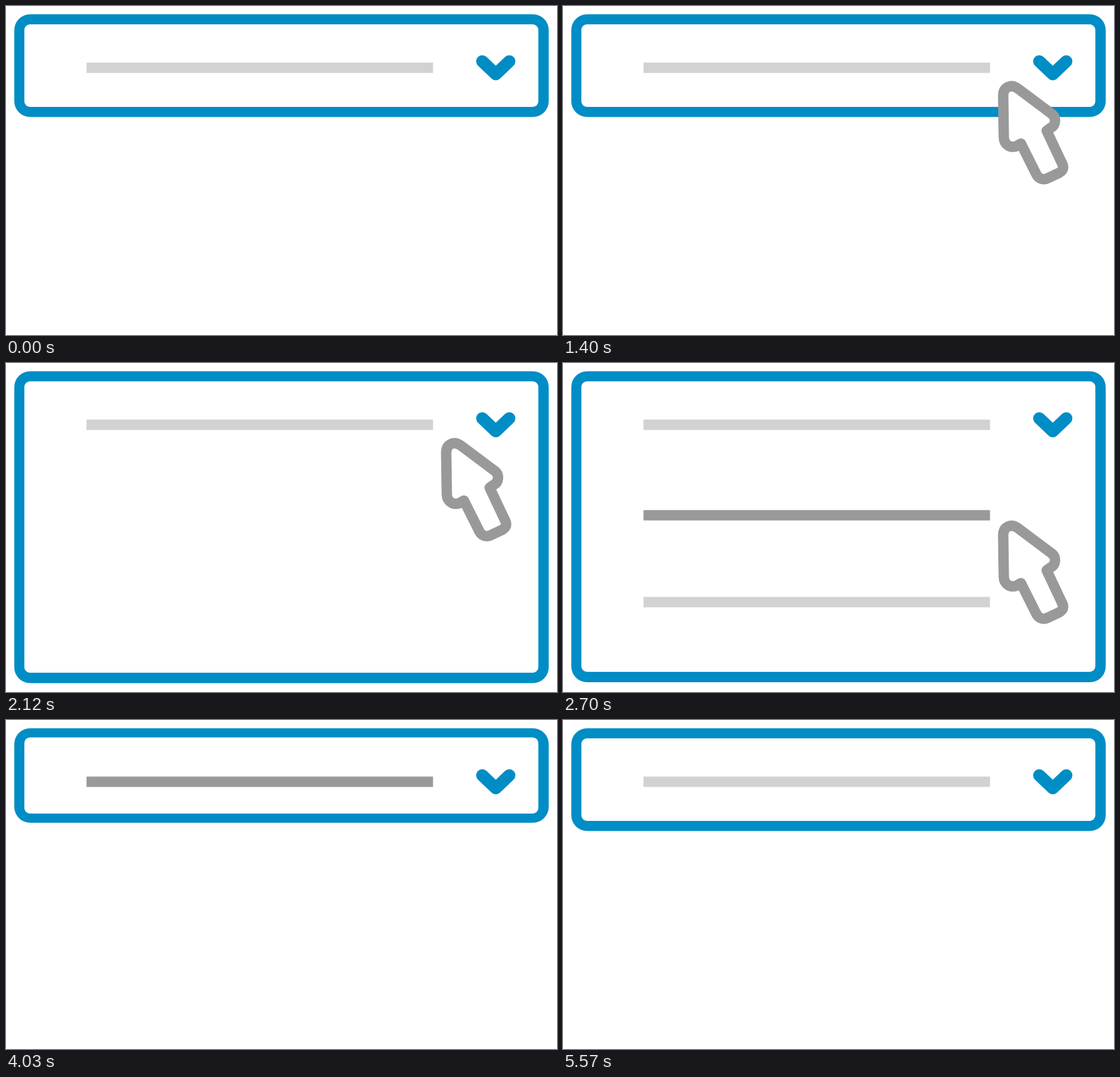
Animation, 900 px wide and 538 px high, one loop 5910 ms. Source, as an HTML page:

```html
<!DOCTYPE html>
<html lang="en">
<head>
<meta charset="utf-8">
<title>Dropdown</title>
<style>
  html, body { margin: 0; width: 100%; height: 100%; overflow: hidden; background: #fff; }
  svg { display: block; width: 100%; height: 100%; }
  svg * { animation: 5910ms linear infinite; }

  .outer { fill: #008dc5; animation-name: outer; }
  .inner { fill: #fff; animation-name: inner; }
  .chevron { fill: none; stroke: #008dc5; stroke-width: 20; stroke-linecap: round; stroke-linejoin: round; }
  .bar { fill: #d2d2d2; }
  .value { animation-name: value; }
  .choice { animation-name: choice; }
  .other { animation-name: other; }
  .fade { animation-name: fade; }
  .move { animation-name: move; }
  .press { animation-name: press; transform-origin: 680px 123px; }
  .arrow { fill: #fff; stroke: #999; stroke-width: 17; stroke-linejoin: round; }
  .halo { fill: none; stroke: #e0e0e0; stroke-width: 25; stroke-linejoin: round; animation-name: halo; }

  @keyframes outer {
    0%, 30.96% { height: 168px; }
    31.81%, 32.2% { height: 167px; animation-timing-function: ease-in-out; }
    35.87% { height: 510px; }
    38.75%, 64.3% { height: 508.5px; animation-timing-function: ease-in-out; }
    68.19%, 69% { height: 154.5px; animation-timing-function: ease-out; }
    70.56%, 100% { height: 168px; }
  }
  @keyframes inner {
    0%, 30.96% { y: 30px; height: 135px; }
    31.81%, 32.2% { y: 30px; height: 133.5px; animation-timing-function: ease-in-out; }
    35.87% { y: 30px; height: 476.5px; }
    38.75%, 64.3% { y: 30px; height: 475px; animation-timing-function: ease-in-out; }
    68.19%, 69% { y: 28.5px; height: 124.5px; animation-timing-function: ease-out; }
    70.56%, 100% { y: 30px; height: 135px; }
  }
  @keyframes value {
    0%, 66.5% { fill: #d2d2d2; }
    67.5%, 83.6% { fill: #999; }
    87.31%, 100% { fill: #d2d2d2; }
  }
  @keyframes choice {
    0%, 36.3% { opacity: 0; fill: #d2d2d2; transform: none; }
    38.75%, 43.5% { opacity: 1; fill: #d2d2d2; }
    45.2% { fill: #999; }
    64.3% { opacity: 1; transform: none; animation-timing-function: ease-in-out; }
    67.5% { opacity: 1; fill: #999; transform: translateY(-148px); }
    67.6%, 100% { opacity: 0; fill: #999; transform: translateY(-148px); }
  }
  @keyframes other {
    0%, 36.3% { opacity: 0; }
    38.75%, 64.3% { opacity: 1; }
    66%, 100% { opacity: 0; }
  }
  @keyframes fade {
    0%, 9.3% { opacity: 0; }
    14.2%, 64.3% { opacity: 1; }
    66%, 100% { opacity: 0; }
  }
  @keyframes move {
    0%, 41.2% { transform: none; animation-timing-function: ease-in-out; }
    45.5%, 100% { transform: translateY(135px); }
  }
  @keyframes press {
    0%, 26.23%, 31.13%, 54.99%, 60.58%, 100% { transform: none; }
    27.75%, 29.27%, 57.19%, 58.54% { transform: scale(.95); }
  }
  @keyframes halo {
    0%, 26.23%, 31.13%, 54.99%, 60.58%, 100% { opacity: 0; }
    27.75%, 29.27%, 57.19%, 58.54% { opacity: 1; }
  }
</style>
</head>
<body>
<svg viewBox="0 0 900 538">
  <defs>
    <path id="pointer" d="M719 147C719 132 732 127 743 135L799 177C806 183 805 195 797 199L790 204L814 255C819 264 817 269 810 273L793 281C785 285.500 777 283 773 275L748 225L741 229C731 233 720 227 720 214Z"/>
  </defs>
  <rect class="outer" x="13.500" y="13.500" width="873" height="168" rx="26"/>
  <rect class="inner" x="30" y="30" width="839.500" height="135" rx="9"/>
  <rect class="bar value" x="131.500" y="92.500" width="566" height="17"/>
  <rect class="bar other" x="131.500" y="382.500" width="566" height="17"/>
  <rect class="bar choice" x="131.500" y="240.500" width="566" height="17"/>
  <path class="chevron" d="M778 90.500L800 111.500L822 90.500"/>
  <g class="fade"><g class="move"><g class="press">
    <use class="halo" href="#pointer"/>
    <use class="arrow" href="#pointer"/>
  </g></g></g>
</svg>
</body>
</html>
```
